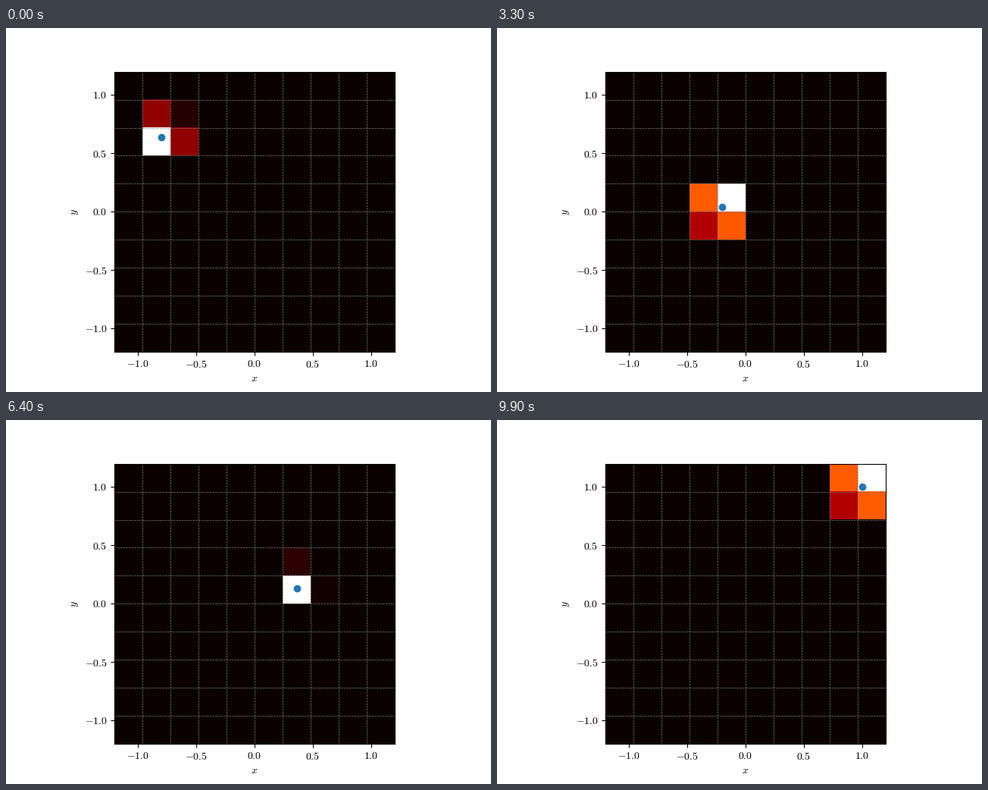
Recreate the animation shown at these times as a matplotlib script. Size 640 by 480 pixels, loop 10 s.

```python
import numpy as np
import matplotlib.pyplot as plt
from matplotlib.animation import FuncAnimation

plt.rcParams.update({
    "font.family": "Liberation Serif",
    "mathtext.fontset": "cm",
    "font.size": 10,
})

FRAMES = 100
CELLS = 10
LIMIT = 1.2
xs = np.linspace(-0.8, 1, FRAMES)
edges = np.linspace(-LIMIT, LIMIT, CELLS + 1)
centers = (edges[:-1] + edges[1:]) / 2


def hat(p):
    """Linear interpolation weights of p on the cell centres."""
    return np.clip(1 - np.abs(p - centers) * CELLS / (2 * LIMIT), 0, 1)


def weights(x):
    w = np.outer(hat(x**2), hat(x))
    return w / w.max()


fig, ax = plt.subplots(figsize=(6.4, 4.8), dpi=100)
image = ax.imshow(weights(xs[0]), cmap="hot", vmin=0, vmax=1, origin="lower",
                  extent=(-LIMIT, LIMIT, -LIMIT, LIMIT))

for e in edges[1:-1]:
    for line in (ax.axvline, ax.axhline):
        line(e, color="gray", ls="--", lw=0.5, zorder=1.5)

dot, = ax.plot([], [], "o", color="tab:blue", zorder=2)

ticks = np.arange(-1, 1.1, 0.5)
labels = [f"${t:.1f}$" for t in ticks]
ax.set_xticks(ticks, labels)
ax.set_yticks(ticks, labels)
ax.set_xlim(-LIMIT, LIMIT)
ax.set_ylim(-LIMIT, LIMIT)
ax.set_xlabel("$x$")
ax.set_ylabel("$y$")


def update(i):
    x = xs[i]
    image.set_data(weights(x))
    dot.set_data([x], [x**2])
    return image, dot


anim = FuncAnimation(fig, update, frames=FRAMES, interval=100,
                     repeat=True, repeat_delay=0)
plt.show()
```
